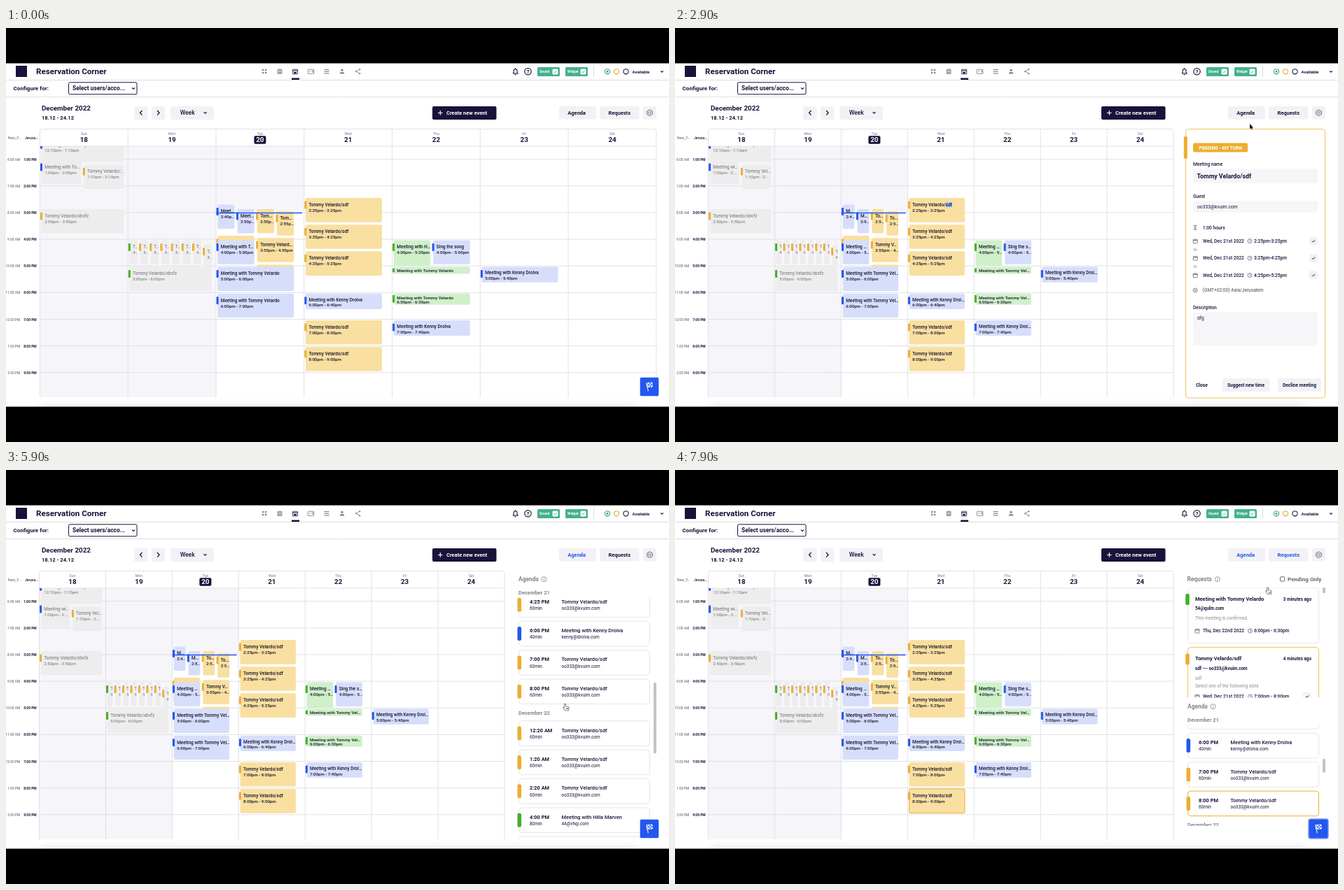
An HTML page with a canvas for the animation above (8000 ms loop, 947 by 592 pixels).

```html
<!DOCTYPE html>
<html lang="en">
<head>
<meta charset="utf-8">
<title>Weekly calendar</title>
<style>
html,body{margin:0;width:947px;height:592px;overflow:hidden;background:#000}
canvas{display:block;width:947px;height:592px}
</style>
</head>
<body>
<canvas id="c"></canvas>
<script>
const cv = document.getElementById('c'), g = cv.getContext('2d');
const dpr = window.devicePixelRatio || 1;
cv.width = 947 * dpr; cv.height = 592 * dpr;

const INK = '#17133a', BLUE = '#2457ee', GRAY = '#85858c', SOFT = '#f2f2f6', LINE = '#dedee2', PAST = '#f6f6fa';
const MARK = { b: '#2457ee', y: '#ecae30', g: '#43b02a' };
const FILL = { b: '#d7defb', y: '#f9dfa0', g: '#cff0c9' };
const GUEST = 'Tommy Velardo', PAL = 'Kenny Drolva', MEET = 'Meeting with ';
const TITLE = { m: MEET + GUEST, s: GUEST + '/sdf', x: GUEST + '/xbvfz', k: MEET + PAL, h: MEET + 'Hilla Marven', o: 'Sing the song' };
const MAIL = { a: 'oo333@kvuim.com', t: 'mipo@zelk.com', d: '44@vhqi.com', e: '54@qulm.com', k: 'kenny@drolva.com', i: 'oo@kvuim.com', z: 'bnw@qulm.com' };

// day, start, minutes, colour, title, slot/slots, group
const events = `0 12:10 60 b m 0/1|0 1:00 60 b m 0/2|0 1:10 60 y s 1/2|0 2:50 60 y x 0/1
1 4:00 60 g x 0/8|1 4:00 60 y x 1/8|1 4:00 60 y x 2/8|1 4:00 60 y x 3/8|1 4:00 60 y x 4/8|1 4:00 60 y x 5/8|1 4:00 60 y x 6/8|1 4:10 60 y x 7/8|1 5:00 60 g x 0/1
2 2:40 60 b m 0/4|2 2:50 60 b m 1/4|2 2:50 60 y s 2/4|2 2:55 60 y s 3/4|2 3:50 60 y s 0/2|2 3:55 60 y s 1/2|2 4:55 60 y s 1/2
2 4:00 60 b m 0/2 T|2 5:00 60 b m 0/1 T|2 6:00 60 b m 0/1 T
3 2:25 60 y s 0/1 W|3 3:25 60 y s 0/1 W|3 4:25 60 y s 0/1 W|3 6:00 40 b k 0/1 K|3 7:00 60 y s 0/1|3 8:00 60 y s 0/1
4 4:00 80 g h 0/2|4 4:00 60 b o 1/2|4 5:00 20 g m 0/1|4 6:00 30 g m 0/1|4 7:00 40 b k 0/1 K|5 5:00 40 b k 0/1 K`
  .split(/[|\n]/).map(s => {
    const [day, at, len, col, title, slot, group] = s.split(' ');
    const [h, m] = at.split(':').map(Number), [i, n] = slot.split('/').map(Number);
    const start = h % 12 * 60 + m, end = start + +len;
    const clock = v => (Math.floor(v / 60) % 12 || 12) + ':' + String(v % 60).padStart(2, '0') + 'pm';
    return { day: +day, key: day + ' ' + at, len: +len, col, title: TITLE[title], i, n, group, start, label: clock(start) + ' - ' + clock(end) };
  });
const groupOf = key => { const e = events.find(e => e.key === key); return e && e.group; };

// agenda: heading rows start with '#'
const agenda = [];
{
  let y = 172, day = 1;
  `#Today|3:50P 60 s a y|3:55P 60 s a y|4:00P 60 m t b|4:55P 60 s a y|5:00P 60 m t b|6:00P 60 m t b
#December 21|12:20A 60 s a y|1:20A 60 s a y|2:20A 60 s a y|2:25P 60 s a y|3:25P 60 s a y|4:25P 60 s a y|6:00P 40 k k b|7:00P 60 s a y|8:00P 60 s a y
#December 22|12:20A 60 s a y|1:20A 60 s a y|2:20A 60 s a y|4:00P 80 h d g|4:00P 60 o t b|5:00P 20 m d g|6:00P 30 m e g|7:00P 40 k k b
#December 23|5:00P 40 k k b
#December 25|4:00P 60 s i g|8:05P 60 s a g
#December 26|4:00P 60 x z g|5:00P 60 x z g`.split(/[|\n]/).forEach(s => {
    if (s[0] === '#') {
      if (day > 1) y -= 10.7;
      agenda.push({ head: s.slice(1), y });
      day++; y += 29;
    } else {
      const [at, len, title, mail, col] = s.split(' '), time = at.slice(0, -1);
      agenda.push({ time: time + ' ' + at.slice(-1) + 'M', key: at.endsWith('P') ? day + ' ' + time : '-', len: len + 'min', title: TITLE[title], mail: MAIL[mail], col, y });
      y += 41.4;
    }
  });
}

const hovers = [[0, ''], [470, '3 2:25'], [1050, ''], [4650, '2 3:55'], [4880, '2 4:00'], [4980, '2 4:55'], [5080, '2 5:00'], [5580, ''], [6400, '5 5:00'], [6750, ''], [7350, '3 8:00']];
const path = [[80, 668, 292], [300, 491, 257], [1400, 491, 257], [1800, 820, 300], [2200, 911, 354], [2600, 762, 511], [2760, 762, 511], [2900, 821, 137], [3050, 826, 128], [3650, 828, 128], [4300, 815, 245], [4650, 815, 245], [5080, 794, 376], [5500, 800, 366], [6100, 800, 330], [6380, 548, 359], [6550, 548, 359], [6900, 800, 380], [7300, 848, 296], [7500, 876, 124], [7650, 876, 124], [7900, 848, 173]];

const ramp = (t, a, b) => Math.min(1, Math.max(0, (t - a) / (b - a)));
const ease = p => p * p * (3 - 2 * p);
const within = (t, a, b) => t >= a && t < b;

function box(x, y, w, h, fill, stroke, r = 0, lw = 1) {
  g.beginPath(); g.roundRect(x, y, w, h, r);
  if (fill) { g.fillStyle = fill; g.fill(); }
  if (stroke) { g.strokeStyle = stroke; g.lineWidth = lw; g.stroke(); }
}
function line(c, lw, ...p) {
  g.beginPath();
  for (let i = 0; i < p.length; i += 2) g.lineTo(p[i], p[i + 1]);
  g.strokeStyle = c; g.lineWidth = lw; g.stroke();
}
function ring(x, y, r, c, lw = 1, fill) {
  g.beginPath(); g.arc(x, y, r, 0, 7);
  if (fill) { g.fillStyle = fill; g.fill(); }
  if (lw) { g.strokeStyle = c; g.lineWidth = lw; g.stroke(); }
}
const setFont = (size, weight) => { g.font = `${weight} ${size}px Roboto, sans-serif`; };
function text(s, x, y, size, weight = 400, c = INK, align = 'left') {
  setFont(size, weight);
  g.fillStyle = c; g.textAlign = align;
  g.fillText(s, x, y + size * .355);
}
function fit(s, w) {
  if (g.measureText(s).width <= w) return s;
  let n = s.length;
  while (n > 1 && g.measureText(s.slice(0, n) + '…').width > w) n--;
  return s.slice(0, n) + '…';
}
function clip(x, y, w, h) { g.save(); g.beginPath(); g.rect(x, y, w, h); g.clip(); }
const chevron = (x, y, c = INK, s = 2) => line(c, 1.2, x - s, y - s / 2, x, y + s / 2, x + s, y - s / 2);
const tick = (x, y, c, s = 1) => line(c, 1, x - 2 * s, y, x - .6 * s, y + 1.5 * s, x + 2.2 * s, y - 1.6 * s);
function calIcon(x, y, c, s = 3) {
  box(x - s, y - s + .5, 2 * s, 2 * s - .5, null, c, .6, .8);
  line(c, 1.1, x - s, y - s / 3, x + s, y - s / 3);
}
function clockIcon(x, y) { ring(x, y, 3, '#666674', .8); line('#666674', .8, x, y - 2, x, y, x + 1.6, y + .6); }
function info(x, y) { ring(x, y, 3.6, GRAY, .8); line(GRAY, .9, x, y - .5, x, y + 2); line(GRAY, .9, x, y - 2, x, y - 1.2); }

function topBar() {
  box(14, 54, 16, 16, INK);
  text('Reservation Corner', 43, 62.3, 11.6, 700);
  for (const [dx, dy] of [[-2, -2], [2, -2], [-2, 2], [2, 2]]) box(369 + dx - 1.2, 62 + dy - 1.2, 2.4, 2.4, GRAY, null, .6);
  box(387.5, 58.5, 7, 7.5, '#a3a3a8', null, 1.5); line('#fff', .8, 389, 62, 393, 62);
  calIcon(413, 62.3, INK, 3.6); line(INK, 2, 411, 64, 415, 64);
  box(408, 71.5, 11, 2.5, INK);
  box(431.2, 59.2, 8.6, 6.2, null, GRAY, .6, .9); line(GRAY, .9, 433, 62, 435, 62); line(GRAY, .9, 436.5, 61, 438.5, 61, 438.5, 64);
  for (const y of [59.5, 62.2, 65]) line(GRAY, 1.2, 454.5, y, 461.5, y);
  ring(480, 60.3, 1.7, GRAY, 0, GRAY); box(476.8, 63, 6.4, 2.6, GRAY, null, [2, 2, 0, 0]);
  line(GRAY, .9, 505.5, 59, 500, 62.2, 505.5, 65.3); for (const [x, y] of [[500, 62.2], [505.3, 59.2], [505.3, 65.2]]) ring(x, y, 1.1, GRAY, 0, GRAY);
  line(INK, 1.1, 724, 65, 725.2, 63.5, 725.2, 60, 727.6, 58, 730, 60, 730, 63.5, 731.2, 65, 724, 65); line(INK, 1.1, 726.5, 66.7, 728.7, 66.7);
  ring(745.5, 62.3, 4.7, INK, 1.2); text('?', 745.5, 62.4, 7.5, 700, INK, 'center');
  for (const [x, s] of [[759, 'Sound'], [799, 'Widget']]) {
    box(x, 56, 32, 13, '#43b08f', null, 1.5);
    text(s, x + 3, 62.4, 5, 700, '#fff');
    box(x + 21.5, 58.5, 8, 8, '#fff', null, 1.5); tick(x + 25.5, 62.5, '#43b08f', .9);
  }
  line(LINE, 1, 839.5, 54, 839.5, 70);
  ring(859, 62.3, 3.6, '#38a57f', 1.1); ring(859, 62.3, 1.5, INK, 0, '#38a57f');
  ring(872, 62.3, 3.6, '#eba62b', 1.1); ring(885.5, 62.3, 3.6, INK, 1.1);
  text('Available', 894.5, 62.4, 6, 700); chevron(937, 62.3, INK, 1.8);
  line(LINE, 1, 0, 74.5, 947, 74.5); line(LINE, 1, 0, 98.5, 947, 98.5);
  text('Configure for:', 10.5, 86.6, 8.1, 700);
  box(89.5, 77.8, 97.5, 17, '#fff', INK, 2);
  text('Select users/acco...', 95, 86.5, 8.4, 700); chevron(182, 86.3);
}
function toolbar(t) {
  text('December 2022', 51, 115, 9.8, 700);
  text('18.12 - 24.12', 51, 128.4, 7.6, 700);
  box(183, 112, 19.5, 19, SOFT, null, 2); line(INK, 1.3, 194.5, 118, 191.5, 121.3, 194.5, 124.6);
  box(208, 112, 19, 19, SOFT, null, 2); line(INK, 1.3, 216, 118, 219, 121.3, 216, 124.6);
  box(235, 112, 62, 19, SOFT, null, 2); text('Week', 248.7, 121.4, 8.5, 500); chevron(284.5, 121.2);
  box(609, 112, 91.5, 19, INK, null, 2);
  line('#fff', 1.1, 617, 121.4, 623.6, 121.4); line('#fff', 1.1, 620.3, 118, 620.3, 124.8);
  text('Create new event', 629, 121.4, 7.5, 700, '#fff');
  box(790, 112, 53, 18.5, SOFT, null, 2); text('Agenda', 815.2, 121, 7.5, 700, t > 3400 ? BLUE : INK, 'center');
  box(848, 112, 56.5, 18.5, SOFT, null, 2); text('Requests', 876.2, 121, 7.5, 700, t > 7400 ? BLUE : INK, 'center');
  box(910, 112, 19, 18.5, SOFT, null, 2);
  g.beginPath();
  for (let i = 0; i < 7; i++) g.lineTo(919.5 + 4.4 * Math.sin(i * Math.PI / 3), 121.2 + 4.4 * Math.cos(i * Math.PI / 3));
  g.strokeStyle = '#666677'; g.lineWidth = 1; g.stroke(); ring(919.5, 121.2, 1.7, '#666677', .9);
}

// after a hover change, the other events of that group fade back in
function groupAlpha(e, t, hover) {
  let alpha = 1;
  if (!e.group || hover === e.key) return alpha;
  for (let k = 1; k < hovers.length && hovers[k][0] <= t; k++)
    if (groupOf(hovers[k][1]) === e.group || groupOf(hovers[k - 1][1]) === e.group)
      alpha = ramp(t, hovers[k][0], hovers[k][0] + 250);
  return alpha;
}
function drawEvent(e, t, L, w, hover) {
  let alpha = groupAlpha(e, t, hover);
  const past = e.day < 2, inner = past ? w * .974 - 5 : w * .958 - 11.5;
  const step = (inner + 4) / e.n, ew = step - 4;
  const x = L + e.day * w + 2.2 + e.i * step;
  const y = 187.6 + (e.start - 60) * .6358 + 1.4 + 6 * (1 - alpha);
  const h = Math.min(e.len, 63) * .62 - 2.6, short = e.len < 35;
  g.save();
  if (t > 3650) alpha *= ramp(t, 4080, 4320);
  g.globalAlpha = alpha;
  box(x, y, ew, h, past ? '#ededee' : FILL[e.col], null, 2);
  if (hover === e.key) box(x, y, ew, h, null, MARK[e.col], 2);
  box(x - 1.6, y + (short ? 2 : 4.5), 3, Math.min(11, h - (short ? 4 : 9)), MARK[e.col], null, 1.2);
  clip(x + 2, y, ew - 2, h);
  const c = past ? '#6f6f74' : '#15142b', ty = y + (e.len < 25 ? 4.8 : short ? 5.6 : e.len < 45 ? 8.5 : 9.6);
  const tw = short ? 6.2 : 6.45;
  setFont(tw, 500);
  const s = fit(e.title, ew - 3.8);
  if (e.key === '3 2:25' && within(t, 500, 3650)) {
    const a = g.measureText(GUEST + '/').width;
    box(x + 4.6 + a, ty - 4, g.measureText('sdf').width, 8, '#a9c8f5');
  }
  text(s, x + 4.6, ty, tw, past ? 400 : 500, c);
  if (e.len > 25) {
    setFont(6.1, 500);
    text(fit(e.label, ew - 3.8), x + 4.6, ty + (short ? 6.6 : 8), 6.1, past ? 400 : 500, c);
  }
  g.restore(); g.restore();
}

function calendar(t, hover, cur) {
  const q = ramp(t, 712, 1282) - ramp(t, 3000, 3570) + ramp(t, 3755, 4300);
  const L = 48.4 - .9 * q, w = (880.5 - 216 * q) / 7, R = L + 7 * w;
  box(L, 169, 2 * w, 359, PAST); box(L + 2 * w, 169, w, 95, PAST);
  text('New_Y...', 3, 157.5, 5, 400, '#55555c'); text('Jerusa...', 27, 157.5, 5, 500);
  for (let i = 0; i < 9; i++) {
    const y = 187.6 + i * 38.15, h = i + 6;
    line(LINE, .9, L, y, R, y);
    text((h > 12 ? h - 12 : h) + ':00 ' + (h < 12 ? 'AM' : 'PM'), 20.2, y + .4, 4.9, 400, '#55555c', 'right');
    text(i + 1 + ':00 PM', 43.6, y + .4, 4.9, 700, INK, 'right');
  }
  box(L, 144.5, R - L, 390, null, LINE, 3, .9);
  box(L - 2, 528.3, R - L + 4, 8, '#fff');
  line(LINE, .9, L, 169, R, 169);
  for (let i = 1; i < 7; i++) line(LINE, .9, L + i * w, 144.5, L + i * w, 528);
  ['Sun', 'Mon', 'Tue', 'Wed', 'Thu', 'Fri', 'Sat'].forEach((d, i) => {
    const x = L + (i + .5) * w;
    text(d, x, 151.4, 5.2, 400, '#77777f', 'center');
    if (i === 2) box(x - 8.5, 154.3, 17, 11.4, INK, null, 2);
    text(18 + i, x, 160, 9.8, 700, i === 2 ? '#fff' : INK, 'center');
  });
  if (within(t, 1060, 1420)) {
    const x = L + Math.floor((cur[0] - L) / w) * w;
    box(x + 2.2, 227, w - 3.8, 35.8, '#fff', BLUE, 2);
    const m = x + w / 2;
    line(BLUE, .8, m - 3, 244.5, m + 3, 244.5); line(BLUE, .8, m, 241.5, m, 247.5);
  }
  clip(0, 169, 947, 359.5);
  events.forEach(e => drawEvent(e, t, L, w, hover));
  g.restore();
  line(BLUE, 1.5, L + 2 * w, 264.4, L + 3 * w - 2.8, 264.4);
}

function detail(t) {
  g.save(); g.globalAlpha = ramp(t, 1290, 1400);
  box(729.5, 144.5, 199, 384.5, '#fff', '#efc35c', 4);
  box(726.8, 155, 5, 32, MARK.y, null, 2);
  box(740, 164.5, 78, 13, MARK.y, null, 2.5);
  text('PENDING - MY TURN', 779, 171.2, 6.5, 700, '#fff', 'center');
  text('Meeting name', 740, 194.2, 6.6, 500);
  box(740, 201.5, 178, 20, '#f6f6f9', null, 2); text(TITLE.s, 745.5, 211.5, 8.8, 700);
  text('Guest', 740, 240.3, 6.6, 500);
  box(740, 247.5, 178, 16.5, '#f6f6f9', null, 2); text(MAIL.a, 746, 256, 6.7);
  line('#666674', .8, 741, 282.3, 745, 282.3, 741, 288.2, 745, 288.2, 741, 282.3);
  text('1:00 hours', 753.7, 285.4, 6.7, 500);
  [2, 3, 4].forEach((h, i) => {
    const y = 304.7 + i * 24.4;
    calIcon(743.2, y, '#666674'); text('Wed, Dec 21st 2022', 754, y, 6.6, 500);
    clockIcon(821, y); text(`${h}:25pm-${h + 1}:25pm`, 827, y, 6.6, 500);
    box(906, y - 6, 12, 12, SOFT, null, 2); tick(912, y, INK);
    if (i < 2) text('Or', 740.2, y + 12.3, 5.3, 400, '#77777f');
  });
  ring(743.2, 375, 3, '#666674', .7); line('#666674', .6, 740, 375, 746, 375); line('#666674', .6, 743.2, 372, 743.2, 378);
  text('(GMT+02:00) Asia/Jerusalem', 753.7, 375, 6.6, 400, '#44444f');
  text('Description', 740, 399.3, 6.6, 500);
  box(740, 406.5, 178, 48, '#f6f6f9', null, 2); text('dfg', 746, 414.7, 6.6);
  text('Close', 744, 510.8, 6.6, 700);
  box(782, 501, 67.5, 19, SOFT, null, 2); text('Suggest new time', 815.5, 510.8, 6.6, 700, INK, 'center');
  box(861, 501, 62, 19, SOFT, null, 2); text('Decline meeting', 892, 510.8, 6.6, 700, INK, 'center');
  g.restore();
}

function agendaPanel(t, hover, split) {
  const scroll = 861 * ease(ramp(t, 5550, 6200)) - 357 * ease(ramp(t, 6900, 7300));
  const dy = split ? 182 : 0, top = 167 + dy, bottom = split ? 509 : 528, view = bottom - top;
  g.save(); g.globalAlpha = ramp(t, 4200, 4300);
  text('Agenda', 732, 156.2 + dy, 8.4, 700, GRAY); info(768.5, 156.2 + dy);
  clip(726, top, 206, view);
  let sticky = agenda[0];
  for (const a of agenda) {
    const y = a.y - scroll + dy;
    if (a.head) {
      if (y <= 175 + dy) sticky = a;
      else text(a.head, 732, y, 7.5, 700, GRAY);
      continue;
    }
    if (y < top - 25 || y > bottom + 25) continue;
    const on = hover === a.key;
    box(732.5, y - 17.8, 187, 35.6, '#fff', on ? MARK[a.col] : '#e6e6ea', 4);
    box(730.5, y - 10, 5.6, 20, MARK[a.col], null, 2.5);
    text(a.time, 748, y - 4.6, 7.4, 700); text(a.len, 748, y + 5, 6.4);
    text(a.title, 793.5, y - 4.6, 7.4, 500); text(a.mail, 793.5, y + 5, 6.4);
    if (on && t < 5580) for (let i = -1; i < 2; i++) ring(906, y + i * 3, .8, BLUE, 0, BLUE);
  }
  box(728, top, 194, 15, '#fff');
  text(sticky.head, 732, 175.2 + dy, 7.5, 700, GRAY);
  box(925, top + 1 + scroll / 1283 * view, 4, view * view / 1283, '#c3c3c8', null, 1.5);
  g.restore(); g.restore();
}

function requestCard(y, h, col, title, ago, mail, border) {
  box(732.5, y, 187, h, '#fff', border, 4);
  box(729.2, y + 9, 5.6, 16, MARK[col], null, 2);
  text(title, 743, y + 16.3, 7.5, 700);
  text(ago, 909, y + 16.3, 6.3, 700, INK, 'right');
  text(mail, 743, y + 30, 6.3, 700);
}
function slot(y, day, time) {
  calIcon(746, y, '#666674'); text(day, 754, y, 6.6, 500);
  clockIcon(821.5, y); text(time, 827, y, 6.6, 500);
}
function requests() {
  text('Requests', 731.5, 156.2, 8.4, 700, GRAY); info(774.8, 156.2);
  box(864.5, 152.8, 6.2, 6.2, '#fff', '#55555f', 1, .9);
  text('Pending Only', 875, 156.2, 8.1, 700, '#66666e');
  clip(726, 168, 206, 157.5);
  requestCard(168, 79.5, 'g', TITLE.m, '3 minutes ago', MAIL.e, '#e6e6ea');
  text('This meeting is confirmed.', 743, 211.4, 6.4, 400, '#8d8d94');
  slot(230, 'Thu, Dec 22nd 2022', '6:00pm - 6:30pm');
  requestCard(253.5, 100, 'y', TITLE.s, '4 minutes ago', 'sdf --- ' + MAIL.a, '#efc35c');
  text('sdf', 743, 297.8, 6.4, 400, '#8d8d94');
  text('Select one of the following slots', 743, 309.2, 6.4, 400, '#8d8d94');
  slot(324, 'Wed, Dec 21st 2022', '7:00pm - 8:00pm');
  box(897, 318, 12, 12, SOFT, null, 2); tick(903, 324, INK);
  box(925, 168, 4, 8, '#c3c3c8', null, 1.5);
  g.restore();
}

function flagButton(t) {
  if (t > 6610) {
    const p = (t - 6610) / 600 % 1, d = 10 * p;
    g.globalAlpha = .7 * (1 - p);
    box(905.7 - d, 499.7 - d, 26.6 + 2 * d, 26.6 + 2 * d, BLUE, null, 3 + d / 2);
    g.globalAlpha = 1;
  }
  box(905.7, 499.7, 26.6, 26.6, BLUE, null, 2);
  g.save(); g.translate(915, 507.5); g.rotate(-.06);
  line('#fff', 1, 0, 0, 1.6, 12);
  box(0, 0, 8, 6, null, '#fff', 0, .7);
  for (let i = 0; i < 12; i++) if ((i + (i >> 2)) % 2) box(i % 4 * 2, (i >> 2) * 2, 2, 2, '#fff');
  g.restore();
}

// soft shadow rising from the lower edge of the window
function footShade() {
  clip(0, 528, 947, 13.5);
  g.shadowColor = 'rgba(0,0,0,.16)'; g.shadowBlur = 14 * dpr;
  box(50, 542, 850, 20, '#000');
  g.restore();
}

function cursorAt(t) {
  let k = 0;
  while (k < path.length - 2 && path[k + 1][0] <= t) k++;
  const a = path[k], b = path[k + 1], p = ease(ramp(t, a[0], b[0]));
  return [a[1] + (b[1] - a[1]) * p, a[2] + (b[2] - a[2]) * p];
}
function pointer(t, [x, y]) {
  if (t < 80) return;
  g.save(); g.translate(x, y); g.lineJoin = 'round';
  const arrow = t < 280 || within(t, 1420, 2150) || within(t, 2700, 2990);
  const p = arrow ? [0, 0, 0, 7.6, 1.7, 6.1, 2.8, 8.6, 4, 8, 2.9, 5.6, 5.2, 5.6]
    : [-2, -4.6, -1, -4.6, -.6, -1.2, 3.4, -.4, 4, 1, 3.2, 4.4, -1, 4.4, -4, 1, -3.4, 0, -2, .8];
  g.beginPath();
  for (let i = 0; i < p.length; i += 2) g.lineTo(p[i], p[i + 1]);
  g.closePath();
  g.strokeStyle = arrow ? '#fff' : '#222'; g.lineWidth = arrow ? 1.2 : 1.1; g.stroke();
  g.fillStyle = arrow ? '#111' : '#fff'; g.fill();
  if (!arrow) for (const i of [0, 1.3, 2.6]) line('#333', .6, i, .8, i, 3);
  g.restore();
}

function draw(t) {
  g.setTransform(dpr, 0, 0, dpr, 0, 0);
  box(0, 0, 947, 592, '#000');
  box(0, 50.5, 947, 491, '#fff');
  const hover = hovers.filter(h => h[0] <= t).pop()[1], cur = cursorAt(t), split = t >= 7650;
  topBar();
  toolbar(t);
  calendar(t, hover, cur);
  footShade();
  if (within(t, 1290, 3000)) detail(t);
  if (t > 4200) agendaPanel(t, hover, split);
  if (split) requests();
  if (t < 650 || t > 3100) flagButton(t);
  pointer(t, cur);
}

const begin = performance.now();
function play() {
  draw((performance.now() - begin) % 8000);
  requestAnimationFrame(play);
}
play();
</script>
</body>
</html>
```
